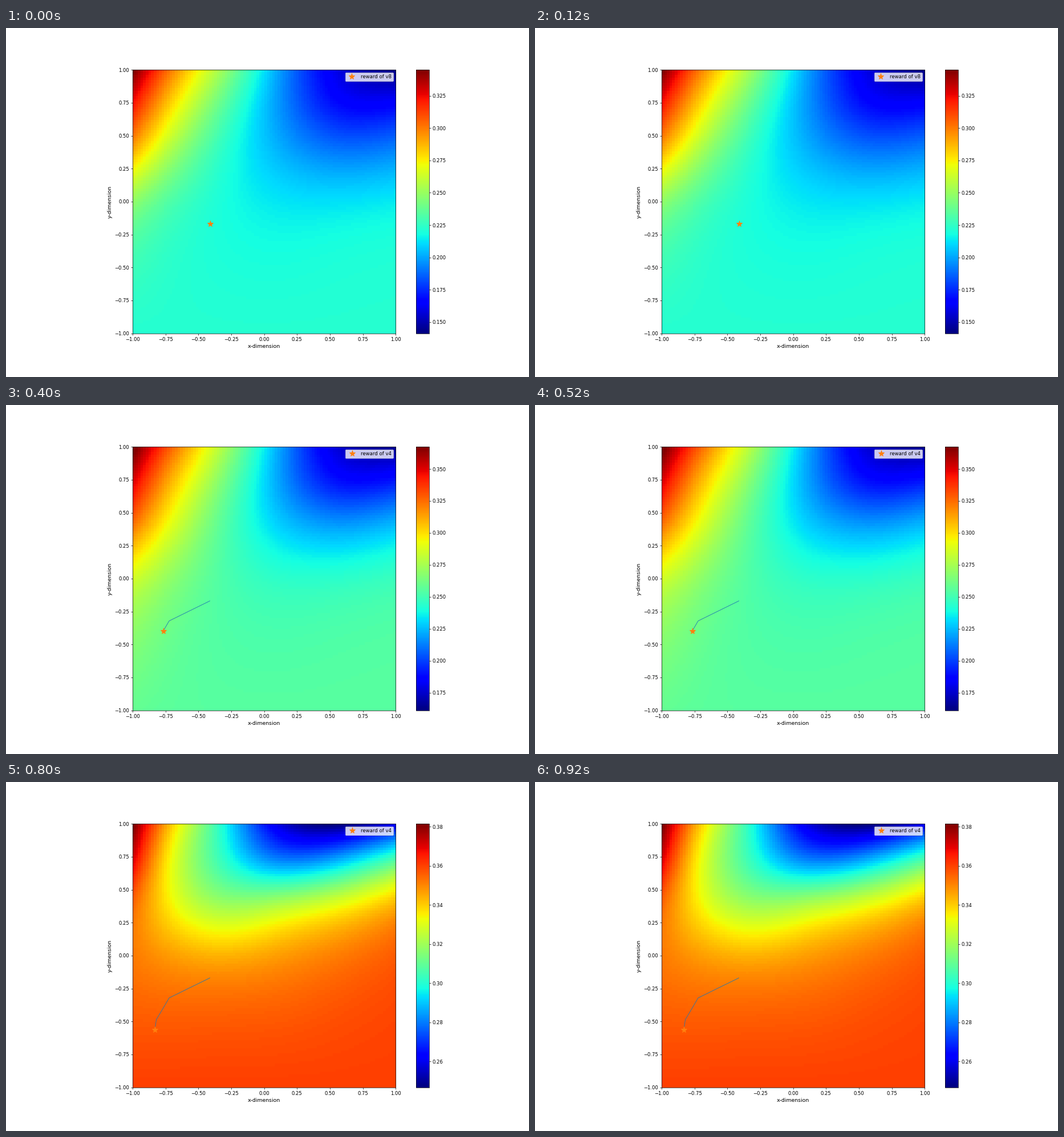
Write a matplotlib script that moves like this. It is 917 px wide and 611 px high and loops after 1 s.

```python
import numpy as np
import matplotlib.pyplot as plt
from matplotlib.animation import FuncAnimation

W, H, DPI = 917, 611, 61.1
plt.rcParams.update({"font.family": "DejaVu Sans", "font.size": 10})

LOWS = [.1413, .1340, .1611, .2019, .2468]
HIGHS = [.3450, .3571, .3673, .3755, .3814]
PATH_X = [-.4125, -.7225, -.768, -.820, -.831]
PATH_Y = [-.169, -.321, -.399, -.486, -.562]

# Relative reward at a few knots, rows downwards; the bottom row is flat
KNOTS_X = np.array([-1, -.75, -.35, .1, .6, 1])
KNOTS_Y = np.array([1, .7, .35, -.1, -1])
EARLY = [[1, .80, .555, .29, .08, .01],
         [.865, .69, .47, .28, .14, .14],
         [.70, .56, .41, .31, .255, .27],
         [.49, .435, .385, .362, .362, .37],
         [.396] * 6]
LATE = [[1, .79, .485, .215, .015, .05],
        [.89, .68, .46, .27, .175, .25],
        [.755, .63, .49, .405, .42, .49],
        [.63, .59, .56, .55, .565, .585],
        [.604] * 6]
FINAL = [[1, .73, .41, .095, .01, .11],
         [.90, .665, .435, .285, .345, .48],
         [.79, .675, .565, .59, .66, .735],
         [.785, .765, .75, .765, .795, .82],
         [.843] * 6]


def spline_matrix(knots, points):
    """Matrix turning values at knots into a natural cubic spline at points."""
    n = len(knots)

    def basis(p):
        return np.column_stack([np.abs(p[:, None] - knots) ** 3,
                                np.ones_like(p), p])

    tail = basis(knots)[:, n:]
    system = np.block([[basis(knots)], [tail.T, np.zeros((2, 2))]])
    return basis(points) @ np.linalg.inv(system)[:, :n]


grid = np.linspace(-1, 1, 100)
to_x = spline_matrix(KNOTS_X, grid)
to_y = spline_matrix(np.exp(KNOTS_Y), np.exp(grid))  # flattens towards y = -1
early, late, final = (to_y @ np.array(k) @ to_x.T for k in (EARLY, LATE, FINAL))
slant = grid[:, None] - 1.5 * grid
ridge = .045 * np.exp(-((slant - 1.5) / .7) ** 2 / 2)
SURFACES = [early, early + ridge, early + .286 * (late - early) + ridge,
            late, final]


def reward(step):
    low, high = LOWS[step], HIGHS[step]
    return low + (high - low) * np.clip(SURFACES[step], 0, 1)


fig = plt.figure(figsize=((W + 1e-6) / DPI, (H + 1e-6) / DPI), dpi=DPI,
                 facecolor="white")
bottom, height = .125, .755
side = height * H / W
ax = fig.add_axes([222 / W, bottom, side, height])
cax = fig.add_axes([718.7 / W, bottom, side / 20, height])

image = ax.imshow(reward(0), cmap="jet", origin="lower", aspect="auto",
                  interpolation="nearest", extent=(-1, 1, -1, 1))
colorbar = fig.colorbar(image, cax=cax)
trail, = ax.plot([], [], color="C0", lw=1)
star, = ax.plot([], [], "*", color="C1", ms=13, label="reward of v8")
legend = ax.legend(loc="upper right")

ax.set(xlim=(-1, 1), ylim=(-1, 1))
for axis in (ax.xaxis, ax.yaxis):
    axis.set_ticks(np.linspace(-1, 1, 9))
    axis.set_major_formatter(
        lambda v, _: f"{v:.2f}".replace("-", "\N{MINUS SIGN}"))
ax.set_xlabel("x-dimension", fontsize=11)
ax.set_ylabel("y-dimension", fontsize=11)


def update(step):
    low, high = LOWS[step], HIGHS[step]
    image.set_data(reward(step))
    image.set_clim(low, high)
    gap, digits = (.025, 3) if high - low > .19 else (.02, 2)
    marks = np.arange(np.ceil(low / gap), np.floor(high / gap) + 1) * gap
    colorbar.set_ticks(marks, labels=[f"{m:.{digits}f}" for m in marks])
    trail.set_data(PATH_X[:step + 1], PATH_Y[:step + 1])
    star.set_data([PATH_X[step]], [PATH_Y[step]])
    legend.get_texts()[0].set_text("reward of v4" if step else "reward of v8")
    return image, trail, star


animation = FuncAnimation(fig, update, frames=5, interval=200, repeat=True,
                          repeat_delay=0, blit=False)
plt.show()
```
